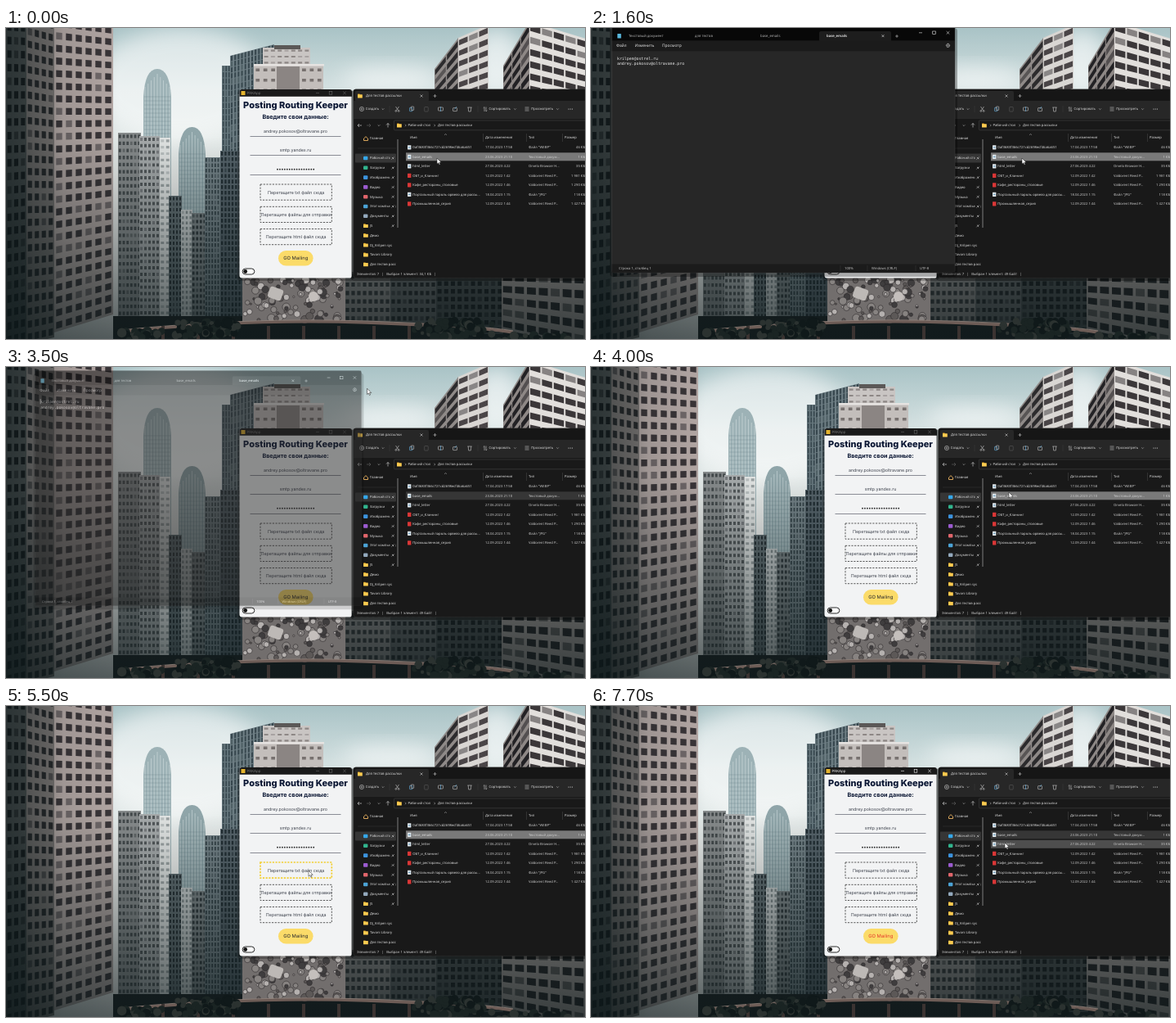
These frames come from a looping animation (708x380 px, 8000 ms). An HTML page:

```html
<!DOCTYPE html>
<html lang="ru">
<head>
<meta charset="utf-8">
<title>Desktop demo</title>
<style>
html, body { margin: 0; width: 100%; height: 100%; overflow: hidden; background: #333; }
svg { display: block; width: 100vw; height: 100vh; }
text { font-family: "Open Sans", sans-serif; white-space: pre; text-rendering: geometricPrecision; }
.app text { font-family: Inter, sans-serif; }
text.mono { font-family: "DejaVu Sans Mono", monospace; }
</style>
</head>
<body>
<svg id="stage" viewBox="0 0 708 380" preserveAspectRatio="none"></svg>
<script>
let seed = 7;
const rnd = () => (seed = (seed * 16807) % 2147483647) / 2147483647;
const pick = list => list[rnd() * list.length | 0];
const times = (n, f) => Array.from({ length: n }, (_, i) => f(i)).join('');

const rect = (x, y, w, h, fill, more = '') =>
  `<rect x="${x}" y="${y}" width="${w}" height="${h}" fill="${fill}" ${more}/>`;
const circle = (x, y, r, fill, more = '') => `<circle cx="${x}" cy="${y}" r="${r}" fill="${fill}" ${more}/>`;
const line = (d, stroke, w = 0.6, more = '') =>
  `<path d="${d}" fill="none" stroke="${stroke}" stroke-width="${w}" ${more}/>`;
const poly = (points, fill) => `<polygon points="${points}" fill="${fill}"/>`;
// y is the middle of the lower-case letters
const text = (x, y, s, size = 4.2, fill = '#e6e6e6', more = '') =>
  `<text x="${x}" y="${y + size * 0.34}" font-size="${size}" fill="${fill}" ${more}>${s}</text>`;
const mid = 'text-anchor="middle"';
const cross = (x, y, r, c) => line(`M${x - r} ${y - r}l${2 * r} ${2 * r}m0 ${-2 * r}l${-2 * r} ${2 * r}`, c);
const plus = (x, y, r, c) => line(`M${x - r} ${y}h${2 * r}M${x} ${y - r}v${2 * r}`, c);
const chevron = (x, y, c = '#bbb') => line(`M${x - 1.3} ${y - 0.6}l1.3 1.3 1.3-1.3`, c);
const folder = (x, y) => rect(x, y - 2.4, 2.8, 2, '#d99a1c', 'rx=".5"') + rect(x, y - 1.7, 5.8, 4.1, '#fbcb50', 'rx=".5"');
const controls = (xs, y, c) =>
  line(`M${xs[0] - 2} ${y}h4`, c) + rect(xs[1] - 1.8, y - 1.8, 3.6, 3.6, 'none', `stroke="${c}" stroke-width=".6"`) +
  cross(xs[2], y, 1.8, c);

// A wall in perspective: corners run TL, TR, BR, BL
function facade(q, cols, rows, wall, glass, fw = 0.6, fh = 0.55) {
  const mix = (a, b, k) => a + (b - a) * k;
  const at = (u, v) => [0, 1].map(i =>
    mix(mix(q[i], q[2 + i], u), mix(q[6 + i], q[4 + i], u), v).toFixed(1)).join(' ');
  let dark = '', pale = '';
  for (let r = 0; r < rows; r++) for (let c = 0; c < cols; c++) {
    const u = (c + (1 - fw) / 2) / cols, v = (r + (1 - fh) / 2) / rows;
    const U = u + fw / cols, V = v + fh / rows;
    const cell = `M${at(u, v)}L${at(U, v)}L${at(U, V)}L${at(u, V)}Z`;
    if (rnd() < 0.14) pale += cell; else dark += cell;
  }
  return poly(q, wall) + `<path d="${dark}" fill="${glass}"/><path d="${pale}" fill="${glass}" opacity=".55"/>`;
}
const block = (x, y, w, h, ...rest) => facade([x, y, x + w, y, x + w, y + h, x, y + h], ...rest);
const bullet = (x, y, w, bottom, fill) =>
  `<path d="M${x} ${bottom}V${y + w}Q${x + 2} ${y} ${x + w / 2} ${y}T${x + w} ${y + w}V${bottom}Z" fill="${fill}"/>` +
  times(9, i => line(`M${x + 2 + i * (w - 4) / 8} ${y + 6 + Math.abs(i - 4) * 4}V${bottom}`, '#e3eaea', 0.9, 'opacity=".5"')) +
  times(22, i => line(`M${x + 1} ${y + w + i * 5}h${w - 2}`, '#5d747a', 0.6, 'opacity=".45"'));
const tree = (x, y, w, h, n) => times(n, () =>
  circle((x + (rnd() + rnd() - 1) * w).toFixed(1), (y + (rnd() - 0.3) * h).toFixed(1), (2 + rnd() * 4).toFixed(1),
    pick(['#10191a', '#1a2423', '#2b3230'])));
const cloud = (x, y, rx, ry, o) =>
  `<ellipse cx="${x}" cy="${y}" rx="${rx}" ry="${ry}" fill="#fff" opacity="${o}" filter="url(#soft)"/>`;

const skyline = () =>
  bullet(168, 50, 34, 330, '#9db2b6') + bullet(211, 121, 33, 345, '#8fa5a9') +
  block(264, 46, 14, 300, 4, 40, '#66777d', '#37474e', 0.5, 0.85) +
  facade([274, 34, 328, 20, 328, 346, 274, 346], 13, 44, '#6e7e84', '#37474e', 0.5, 0.88) +
  block(303, 45, 85, 50, 9, 4, '#c3bebb', '#77716f', 0.5, 0.3) +
  block(314, 24, 58, 22, 7, 3, '#c9c5c3', '#8d8785', 0.6, 0.3) +
  rect(328, 21, 32, 5, '#5b5857') + rect(303, 44, 86, 2.5, '#e6e3e1') + rect(331, 47, 28, 28, '#8b8583') +
  block(137, 128, 28, 225, 6, 26, '#85898a', '#42484a', 0.6, 0.5) +
  block(163, 132, 25, 220, 5, 28, '#a4a8a9', '#525759', 0.6, 0.5) +
  block(188, 134, 13, 218, 2, 28, '#dfe2e1', '#9aa1a2', 0.6, 0.4) +
  block(199, 205, 16, 150, 4, 22, '#5f6b6f', '#273034', 0.5, 0.6) +
  block(214, 222, 14, 130, 3, 20, '#c6cbcb', '#7e8789', 0.5, 0.5) +
  block(227, 226, 18, 126, 4, 18, '#7b8385', '#31393c') +
  block(243, 158, 22, 195, 6, 30, '#748287', '#354348', 0.5, 0.7) +
  block(262, 150, 30, 205, 7, 30, '#56636a', '#222e33', 0.55, 0.7);

const towers = () =>
  facade([0, -10, 25, -8, 25, 384, 0, 390], 3, 24, '#4b5050', '#15191b', 0.6, 0.55) +
  facade([25, -20, 59, -10, 59, 378, 25, 386], 4, 26, '#7a7573', '#252628', 0.6, 0.55) +
  facade([59, -14, 131, -4, 131, 350, 59, 372], 6, 25, '#b3a7a4', '#393437', 0.62, 0.55) +
  facade([524, 50, 553, 12, 553, 320, 524, 320], 2, 24, '#8f8a88', '#2c2b2d', 0.9, 0.55) +
  facade([553, 12, 590, -4, 590, 320, 553, 320], 3, 24, '#d9d6d3', '#4a4547', 0.86, 0.5) +
  facade([608, 46, 640, -8, 640, 320, 608, 320], 3, 22, '#8e8886', '#232225', 0.9, 0.55) +
  facade([640, -8, 712, 14, 712, 320, 640, 320], 5, 22, '#e2dfdc', '#3b3739', 0.86, 0.52);

const street = () =>
  rect(131, 352, 577, 28, '#1d2223') +
  block(414, 298, 56, 62, 8, 6, '#858382', '#343638', 0.6, 0.5) +
  block(470, 298, 56, 62, 8, 6, '#5d6061', '#232628', 0.6, 0.5) +
  block(526, 298, 82, 76, 10, 8, '#454a4b', '#1a1e20', 0.6, 0.55) +
  facade([606, 298, 708, 298, 708, 390, 606, 368], 7, 5, '#99928f', '#242325', 0.75, 0.55);

const mural = () =>
  rect(289, 300, 126, 60, '#726e6d') +
  times(110, () => circle((292 + rnd() * 120).toFixed(1), (307 + rnd() * 50).toFixed(1), (1 + rnd() * 4).toFixed(1),
    pick(['#b5b1af', '#3f3d3e', '#878381', '#5c5857']), 'stroke="#2f2d2e" stroke-width=".6"')) +
  rect(321, 318, 17, 14, '#bdb9b6', 'rx="3" transform="rotate(20 331 325)"') + circle(376, 328, 6, '#c4bfbc');

const bridge = () =>
  line('M140 371Q300 355 440 360T620 372', '#6d5c56', 3.5) + line('M140 369Q300 353 440 358T620 370', '#94847d', 0.8) +
  times(10, i => rect(190 + i * 43, 364, 4, 16, '#3b3331'));

const city = () => rect(0, 0, 708, 380, 'url(#sky)') + cloud(215, 70, 110, 70, 0.55) + cloud(470, 62, 60, 14, 0.6) +
  cloud(600, 40, 30, 40, 0.6) + skyline() + towers() + street() + rect(0, 0, 708, 380, 'url(#shade)') +
  rect(0, 0, 140, 380, 'url(#side)') + mural() + bridge() +
  tree(246, 364, 44, 18, 110) + tree(165, 374, 36, 12, 45) + tree(545, 364, 52, 20, 110) + tree(650, 378, 50, 8, 35);

const zones = [['Перетащите txt файл сюда', 191], ['Перетащите файлы для отправки', 218.3], ['Перетащите html файл сюда', 245.5]];
function app() {
  const navy = '#0b1734', ink = '#3c414c';
  return rect(283, 76, 142, 233, '#000', 'rx="4" opacity=".25"') +
    rect(285.5, 75, 137.5, 230.5, '#f2f3f4', 'rx="3"') +
    `<path d="M285.5 83.7V78q0-3 3-3h131.500q3 0 3 3v5.700z" fill="#1a1a1a"/>` +
    rect(287.5, 77, 5, 5, '#e5b42d') + text(294.5, 79.5, 'PRKApp', 4.4, '#777', 'id="appTitle"') +
    `<g id="appIdle">${controls([381, 397, 414], 79.4, '#666')}</g><g id="appLive">${controls([381, 397, 414], 79.4, '#eee')}</g>` +
    text(354, 94.2, 'Posting Routing Keeper', 11, navy, mid + ' font-weight="800"') +
    text(354, 108.8, 'Введите свои данные:', 7.2, navy, mid + ' font-weight="700"') +
    text(354, 126, 'andrey.pokosov@oltravane.pro', 5.3, ink, mid) +
    text(354, 149.3, 'smtp.yandex.ru', 5.3, ink, mid) +
    times(16, i => circle(332 + i * 2.95, 172.7, 0.9, '#222')) +
    [132.5, 155.5, 179.5].map(y => line(`M298.500 ${y}h111`, '#5d616d', 0.7)).join('') +
    zones.map(([s, y], i) => rect(311, y, 87.3, 19.2, 'none', `id="zone${i}" stroke-dasharray="2.2 1.5"`) +
      text(354.7, y + 9.7, s, 5.3, ink, mid)).join('') +
    rect(333, 272, 42.6, 18.5, '#fbdb69', 'rx="9.250"') +
    text(354.2, 281.2, 'GO Mailing', 5.8, '#26262b', 'id="go" ' + mid) +
    rect(289.2, 294, 14.6, 7, '#fff', 'rx="3.500" stroke="#111" stroke-width=".9"') + circle(292.7, 297.5, 2.4, '#111');
}

const rowY = i => 145.8 + i * 11.5;
const pdf = 'Valdorent Reed P...';
const files = [
  ['0af3683f366c721cd2698ecf46a6a651', '17.04.2023 17:58', 'Файл "WEBP"', '46 КБ'],
  ['base_emails', '23.06.2023 21:10', 'Текстовый докум...', '1 КБ'],
  ['html_letter', '27.06.2023 4:22', 'Orvelo Browser H...', '35 КБ'],
  ['ОБТ_и_Клининг', '12.09.2022 1:42', pdf, '1 981 КБ'],
  ['Кафе_рестораны_столовые', '12.09.2022 1:46', pdf, '1 290 КБ'],
  ['Портальный пароль орвело для рассы...', '18.04.2023 1:15', 'Файл "JPG"', '118 КБ'],
  ['Промышленная_серия', '12.09.2022 1:44', pdf, '1 427 КБ']
];
const places = ['Рабочий стол', 'Загрузки', 'Изображения', 'Видео', 'Музыка', 'Этот компьютер', 'Документы', 'JS',
  'Демо', 'Dj_Krilpen sys', 'Tavoni Library', 'Для тестов рассылки'];
const placeColors = ['#35a7e8', '#31b48d', '#3c93dd', '#9b5bd0', '#e0656b', '#4ba3d6', '#93a9bd'];

function toolbar() {
  const c = '#c8c8c8', y = 99;
  const box = (x, y, w, h, k = c) => rect(x, y, w, h, 'none', `stroke="${k}" stroke-width=".6" rx=".6"`);
  const ring = (x, y, r) => circle(x, y, r, 'none', `stroke="${c}" stroke-width=".6"`);
  return ring(435, y, 2.6) + plus(435, y, 1.4, c) +
    text(439.8, y, 'Создать') + chevron(461, y) + line('M469 95v8', '#3c3c3c') +
    line('M476.500 96l3 4.500m1-4.500l-3 4.500', c) + ring(476.8, 101.4, 0.9) + ring(480.2, 101.4, 0.9) +
    box(493.5, 97.3, 3.4, 4.4, '#69b6e8') + box(495.3, 96, 3.4, 4.4) + box(511.7, 96.5, 4.5, 5.5, '#5c5c5c') +
    box(528.5, 97, 6, 4) + line('M531.500 96v6', '#69b6e8') + box(546.5, 97.6, 5, 4) + line('M548.500 99.500l2.500-3.500', '#69b6e8') +
    line('M564.300 97h5.400m-4.500 0l.5 5h2.600l.5-5', c) + line('M577 95v8', '#3c3c3c') +
    line('M585 102v-5.500l-1.300 1.300m3.300-1.300v5.500l1.300-1.300', c) + text(590.5, y, 'Сортировать') + chevron(622.5, y) +
    line('M634.500 97h5m-5 2h5m-5 2h5', c) + text(642.3, y, 'Просмотреть') + chevron(674.5, y) +
    times(3, i => circle(688 + i * 2.2, y, 0.6, '#ddd'));
}

function explorer() {
  const pin = y => line(`M471.300 ${y + 1.8}l1.400-1.400`, '#aaa') +
    line(`M472.200 ${y - 0.8}l1.900 1.900M473.200 ${y + 0.2}l1.300-1.300`, '#b5b5b5', 1);
  return rect(422, 76, 290, 233, '#000', 'rx="4" opacity=".35"') +
    rect(424.8, 74.8, 290, 230.6, '#191919', 'rx="3" stroke="#3a3a3a" stroke-width=".4"') +
    rect(425.2, 75.2, 290, 14, '#161616', 'rx="2"') + rect(427, 77, 90, 13, '#272727', 'rx="2"') +
    rect(425.2, 89, 290, 21, '#272727') + line('M425 110.500h283', '#333') +
    folder(430, 83) + text(440, 83, 'Для тестов рассылки', 4.35) + cross(508, 83, 1.5, '#ccc') + plus(524.5, 83, 2, '#ccc') + toolbar() +
    line('M435 119h-5m2-2l-2 2 2 2', '#ddd') + line('M441 119h5m-2-2l2 2-2 2', '#666') + chevron(456, 119) +
    line('M467 121.500v-5m-2 2l2-2 2 2', '#ddd') +
    rect(474.5, 113, 240, 11.8, '#191919', 'rx="1" stroke="#4a4a4a" stroke-width=".5"') + folder(478, 119) +
    line('M488 117.700l1.200 1.300-1.200 1.300M523.500 117.700l1.200 1.300-1.200 1.300', '#bbb') +
    text(491.5, 119, 'Рабочий стол') + text(528, 119, 'Для тестов рассылки') +
    text(494, 134, 'Имя') + line('M536 130.800l1.500-1.300 1.500 1.300', '#aaa') + text(586, 134, 'Дата изменения') +
    text(639, 134, 'Тип') + text(683, 134, 'Размер') +
    line('M583.500 129v10m53-10v10m44-10v10', '#444') +
    files.map(([name, date, type, size], i) => {
      const y = rowY(i);
      return rect(489, y - 5, 222, 10, '#444', `id="row${i}"`) +
        rect(491, y - 2.6, 4.4, 5.2, type === pdf ? '#d93636' : '#dfe6ea', 'rx=".4"') +
        (type === pdf ? '' : rect(492, y - 0.6, 2.4, 1.4, '#6f9fc0')) +
        text(497.3, y, name) + text(586, y, date, 4.2, '#d0d0d0') + text(639, y, type, 4.2, '#d0d0d0') +
        text(708, y, size, 4.2, '#d0d0d0', 'text-anchor="end"');
    }).join('') +
    line('M437.500 135l2.500-2.300 2.500 2.300v2.500h-5z', '#d9a65b', 1) + text(445, 135, 'Главная') + line('M430 147h47', '#303030') +
    rect(427, 153.6, 50, 11, '#363636', 'rx="1"') +
    `<g clip-path="url(#nav)">` + places.map((s, i) => {
      const y = 159 + i * 11.8;
      return (i < 7 ? rect(437, y - 2.3, 5.4, 4.6, placeColors[i], 'rx="1"') : folder(437, y)) + text(445, y, s);
    }).join('') + '</g>' +
    times(8, i => rect(469.5, 155 + i * 11.8, 7, 8, i ? '#191919' : '#363636') + pin(159 + i * 11.8)) +
    line('M479 136v108', '#8c8c8c', 0.9) + text(429, 301, '', 4.25, '#d8d8d8', 'id="status"');
}

function notepad() {
  return rect(23, 0, 425, 304, '#000', 'rx="4" opacity=".3"') +
    rect(25.5, -3, 419.5, 302, '#272727', 'rx="3" stroke="#444" stroke-width=".4"') +
    rect(25.7, -3, 419, 18.7, '#080808') + rect(279, 4, 88, 13, '#1d1d1d', 'rx="2"') + rect(25.7, 15.5, 419, 12.8, '#1b1b1b') +
    rect(32.3, 7, 4.5, 5.5, '#59b7dc', 'rx=".6"') +
    text(46, 10, 'Текстовый документ', 4.3, '#bbb') + text(127, 10, 'для тестов', 4.3, '#bbb') +
    text(207, 10, 'base_emails', 4.3, '#bbb') + text(288, 10, 'base_emails', 4.3, '#fff', 'font-weight="600"') +
    cross(357, 9.7, 1.4, '#eee') + plus(374, 10, 1.8, '#ccc') +
    rect(428.3, 0, 16.6, 11, '#c42b1c', 'id="closeHot"') + controls([403, 419.5, 436.5], 5.8, '#e5e5e5') +
    text(31, 21.7, 'Файл', 4.9, '#f0f0f0') + text(53.5, 21.7, 'Изменить', 4.9, '#f0f0f0') + text(87, 21.7, 'Просмотр', 4.9, '#f0f0f0') +
    circle(436.5, 21.3, 2, 'none', 'stroke="#ddd" stroke-width="1" stroke-dasharray="1.2 .37"') + circle(436.5, 21.3, 0.7, '#ddd') +
    `<g id="mails">${text(32, 37.2, 'krilpen@ostrel.ru', 4.88, '#eee', 'class="mono"')}` +
    text(32, 43.8, 'andrey.pokosov@oltravane.pro', 4.88, '#eee', 'class="mono"') + '</g>' +
    rect(31.6, 33.2, 0.7, 6.6, '#fff', 'id="caret"') +
    rect(25.7, 288.5, 419, 10.3, '#1b1b1b') + line('M305 290v7m33-7v7m59-7v7', '#383838') +
    text(34, 293.6, 'Строка 1, столбец 1', 4.2, '#ccc') + text(310, 293.6, '100%', 4.2, '#ccc') +
    text(343, 293.6, 'Windows (CRLF)', 4.2, '#ccc') + text(402, 293.6, 'UTF-8', 4.2, '#ccc');
}

function dialog() {
  return rect(285, 164, 135, 46, '#000', 'rx="2" opacity=".45" filter="url(#blur)"') +
    rect(286.8, 158.3, 131.6, 44.2, '#fff', 'stroke="#8b8b8b" stroke-width=".4"') +
    circle(291, 163.2, 2.3, '#1a7fc4') + text(295.6, 163, 'prk-app', 4.3, '#222') + cross(414, 163, 1.6, '#333') +
    rect(287, 187.8, 131.2, 14.4, '#f0f0f0') +
    circle(296, 178, 6, '#178ac8') + rect(295.3, 176.8, 1.4, 4.4, '#fff') + circle(296, 175, 0.9, '#fff') +
    text(306, 176.4, 'Файл успешно сохранен', 4.2, '#222') +
    rect(391.3, 191, 23.6, 7.4, '#e1e1e1', 'id="ok" stroke="#3a8fd4" stroke-width=".6"') + text(403, 194.6, 'OK', 4.2, '#222', mid);
}

const stage = document.getElementById('stage');
stage.innerHTML = `<defs>
  <linearGradient id="sky" x1="0" y1="0" x2="0" y2="1"><stop offset="0" stop-color="#a9c3c6"/>
    <stop offset=".2" stop-color="#d6e2e2"/><stop offset=".5" stop-color="#eceeec"/></linearGradient>
  <linearGradient id="shade" x1="0" y1="0" x2="0" y2="1"><stop offset=".35" stop-color="#0c1719" stop-opacity="0"/>
    <stop offset="1" stop-color="#0c1719" stop-opacity=".68"/></linearGradient>
  <linearGradient id="side"><stop offset="0" stop-color="#0c1719" stop-opacity=".5"/>
    <stop offset=".5" stop-color="#0c1719" stop-opacity=".12"/><stop offset="1" stop-color="#0c1719" stop-opacity="0"/></linearGradient>
  <filter id="soft" x="-50%" y="-50%" width="200%" height="200%"><feGaussianBlur stdDeviation="12"/></filter>
  <filter id="blur" x="-10%" y="-20%" width="120%" height="150%"><feGaussianBlur stdDeviation="3.5"/></filter>
  <clipPath id="nav"><rect x="426" y="148" width="51" height="146"/></clipPath></defs>
  ${city()}<g class="app">${app()}</g>${explorer()}<g id="dialog">${dialog()}</g><g id="pad">${notepad()}</g>
  <path id="cursor" d="M0 0V7.200L1.700 5.700 2.900 8.300 4 7.800 2.900 5.300H5.200Z" fill="#fff" stroke="#111" stroke-width=".5"/>`;

const el = {};
stage.querySelectorAll('[id]').forEach(e => el[e.id] = e);
const show = (id, on) => el[id].setAttribute('visibility', on ? 'inherit' : 'hidden');
const set = (id, attr, value) => el[id].setAttribute(attr, value);
const clamp = v => Math.max(0, Math.min(1, v));
const smooth = v => v * v * (3 - 2 * v);

// time, x, y
const path = [[0, 527, 159], [2700, 527, 159], [3300, 433, 6], [3450, 433, 6], [3600, 466, 84], [3900, 511, 153],
  [4500, 511, 153], [5400, 370, 201], [5700, 370, 201], [6300, 399, 194], [6900, 399, 194], [7600, 506, 167], [8000, 506, 167]];
function pointer(t) {
  const i = Math.max(1, path.findIndex(p => p[0] > t));
  const [a, b] = [path[i - 1], path[i]];
  const k = smooth((t - a[0]) / (b[0] - a[0]));
  return [a[1] + (b[1] - a[1]) * k, a[2] + (b[2] - a[2]) * k];
}

function draw(now) {
  const t = Math.floor(now % 8000 / 100) * 100;
  const [x, y] = pointer(t);
  set('cursor', 'transform', `translate(${x} ${y})`);

  const open = t < 3500 ? clamp((t - 500) / 400) : clamp((3600 - t) / 200);
  const grow = 0.9 + 0.1 * smooth(open);
  show('pad', open > 0);
  set('pad', 'opacity', smooth(open));
  set('pad', 'transform', `translate(235 150) scale(${grow}) translate(-235 -150)`);
  show('mails', t >= 1000);
  show('caret', t >= 1100 && Math.floor((t - 1100) / 500) % 2 === 0);
  show('closeHot', x > 428 && y < 11);

  const drag = t >= 4500 && t < 5600;
  const hover = x > 489 ? Math.floor((y - rowY(0) + 5.75) / 11.5) : -1;
  files.forEach((_, i) => {
    const picked = i === 1, over = hover === i;
    show('row' + i, picked || over);
    set('row' + i, 'fill', picked && (drag || over) ? '#797979' : over ? '#4e4e4e' : '#363636');
  });
  el.status.textContent = `Элементов: 7   |   Выбран 1 элемент: ${t < 200 ? '34,1 КБ' : '49 байт'}   |`;

  const drop = drag && x > 311 && x < 398;
  zones.forEach(([, top], i) => {
    const hot = drop && y > top && y < top + 19;
    set('zone' + i, 'stroke', hot ? '#f2cf35' : '#333');
    set('zone' + i, 'stroke-width', hot ? 1.7 : 0.8);
  });

  show('dialog', t >= 5700 && t < 7000);
  set('ok', 'fill', t >= 6900 ? '#cce4f7' : t >= 6400 ? '#e0effb' : '#e1e1e1');
  const live = t >= 7000;
  show('appIdle', !live);
  show('appLive', live);
  set('appTitle', 'fill', live ? '#f0f0f0' : '#777');
  set('go', 'fill', live ? '#e5372c' : '#26262b');
}

const start = performance.now();
function tick() {
  draw(performance.now() - start);
  requestAnimationFrame(tick);
}
tick();
</script>
</body>
</html>
```
